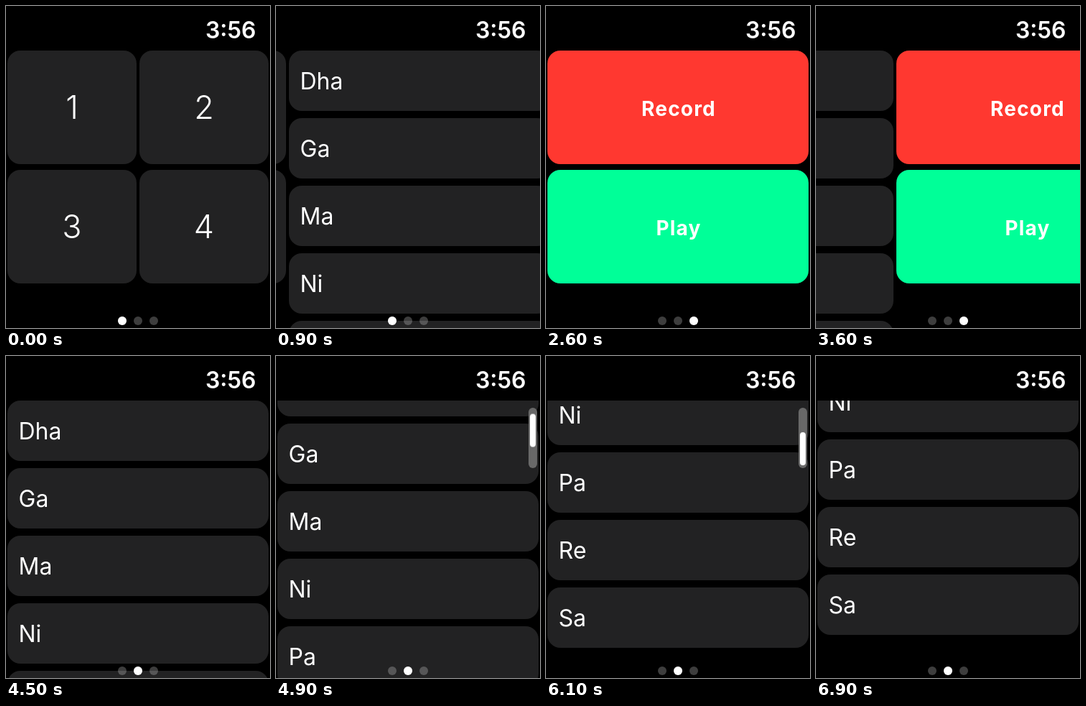
An HTML page for the animation above (8000 ms loop, 368x448 px).

```html
<!DOCTYPE html>
<html lang="en">
<head>
<meta charset="utf-8">
<title>Watch pages</title>
<style>
  html, body { margin: 0; width: 100%; height: 100%; overflow: hidden; background: #000; }
  svg { display: block; width: 368px; height: 448px; }
  text { fill: #fff; font-family: Inter, Roboto, sans-serif; }
  .clock { font-size: 32px; font-weight: 600; text-anchor: end; }
  .digit { font-size: 45px; font-weight: 300; text-anchor: middle; }
  .note { font-size: 32px; font-weight: 400; }
  .action { font-size: 28px; font-weight: 700; letter-spacing: 1.2px; text-anchor: middle; }
</style>
</head>
<body>
<svg viewBox="0 0 368 448">
  <defs><clipPath id="body"><rect y="62" width="368" height="386"/></clipPath></defs>
  <rect width="368" height="448"/>
  <g clip-path="url(#body)">
    <g id="pages">
      <g id="grid"></g>
      <g transform="translate(368 0)"><g id="list"></g></g>
      <g id="actions" transform="translate(736 0)"></g>
    </g>
    <g id="bar" opacity="0">
      <rect x="352" y="72" width="12" height="84" rx="6" fill="#686868"/>
      <rect id="thumb" x="354" y="74" width="8" height="46" rx="4" fill="#fff"/>
    </g>
  </g>
  <g id="dots"></g>
  <text class="clock" x="348.5" y="44.5">3:56</text>
</svg>
<script>
const LOOP = 8000;
const $ = id => document.getElementById(id);

function add(parent, tag, attrs, text) {
  const el = document.createElementNS('http://www.w3.org/2000/svg', tag);
  for (const k in attrs) el.setAttribute(k, attrs[k]);
  if (text) el.textContent = text;
  parent.append(el);
  return el;
}

function card(parent, x, y, width, height, fill = '#222223') {
  add(parent, 'rect', { x, y, width, height, rx: 18, fill });
}

['1', '2', '3', '4'].forEach((n, i) => {
  const x = 2 + (i % 2) * 184, y = 62 + (i >> 1) * 166;
  card($('grid'), x, y, 180, 158);
  add($('grid'), 'text', { class: 'digit', x: x + 90, y: y + 95 }, n);
});

['Dha', 'Ga', 'Ma', 'Ni', 'Pa', 'Re', 'Sa'].forEach((name, i) => {
  const y = 62 + i * 94;
  card($('list'), 2, y, 364, 84);
  add($('list'), 'text', { class: 'note', x: 17.5, y: y + 53.5 }, name);
});

[['Record', '#ff3830'], ['Play', '#00ff98']].forEach(([name, fill], i) => {
  const y = 62 + i * 166;
  card($('actions'), 2, y, 364, 158, fill);
  add($('actions'), 'text', { class: 'action', x: 185, y: y + 90.5 }, name);
});

for (let i = 0; i < 3; i++) {
  add($('dots'), 'circle', { cx: 162 + i * 22, cy: 438, r: 6, fill: '#fff', 'fill-opacity': 0.24 });
}
const active = add($('dots'), 'circle', { cx: 162, cy: 438, r: 6, fill: '#fff' });

// Each step is [ms, value]; the value holds until the next step.
function play(el, steps, style) {
  const last = steps[steps.length - 1][1];
  const frames = [...steps, [LOOP, last]].map(([t, v]) =>
    ({ offset: t / LOOP, easing: 'step-end', ...style(v) }));
  el.animate(frames, { duration: LOOP, iterations: Infinity });
}

// Values spaced 100 ms apart from a start time.
const run = (start, ...values) => values.map((v, i) => [start + i * 100, v]);
const moveX = k => v => ({ transform: `translate(${v * k}px, 0px)` });
const moveY = k => v => ({ transform: `translate(0px, ${v * k}px)` });

const slide = [
  [0, 0],
  ...run(500, 48, 138, 225, 303, 352, 368),
  ...run(1700, 416, 506, 593, 671, 720, 736),
  ...run(3600, 626, 500, 425, 385, 369),
  [4500, 368]
];

const scroll = [
  [0, 0],
  [4600, 6],
  ...run(4800, 28, 62, 104, 150, 193, 229, 250, 264, 274),
  ...run(5700, 280, 287, 294, 300, 304),
  ...run(6300, 310, 316),
  ...run(6700, 318, 321, 322)
];

play($('pages'), slide, moveX(-1));
play($('list'), scroll, moveY(-1));
play($('thumb'), scroll, moveY(34 / 322));
play($('bar'), [[0, 0], [4600, 1], [6700, 0.6], [6800, 0.25], [6900, 0]], v => ({ opacity: v }));
play(active, [[0, 0], [1000, 1], [2200, 2], [4000, 1]], moveX(22));
</script>
</body>
</html>
```
